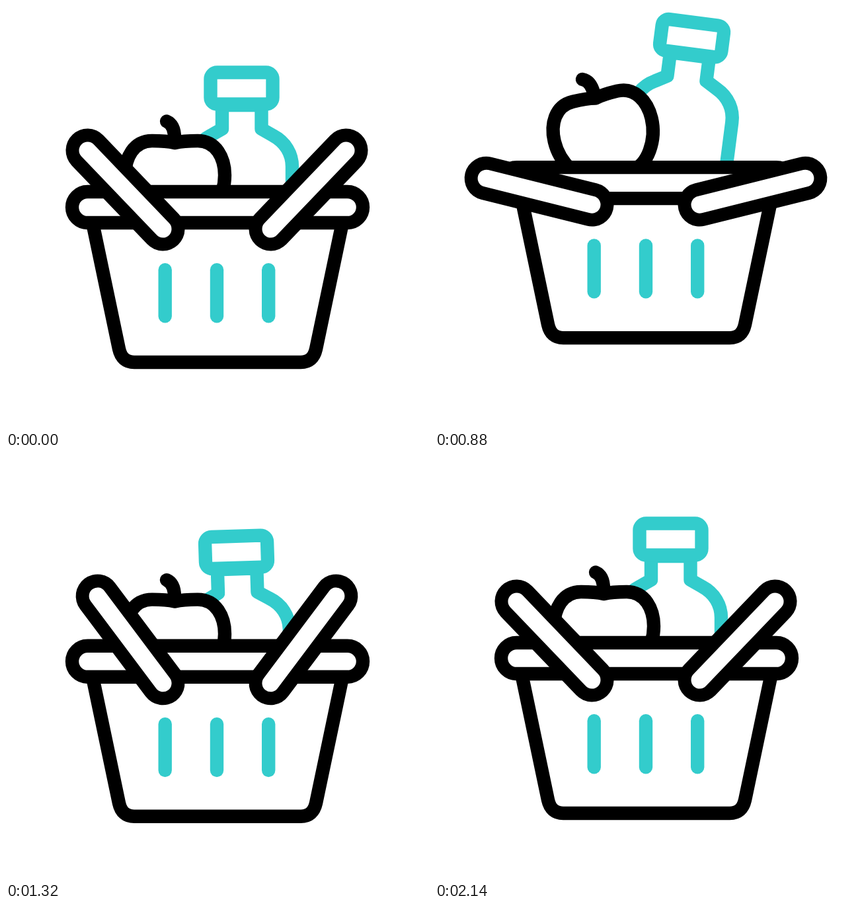
An HTML page with a canvas for the animation above (2.2 s loop, 640 px wide and 640 px high).

```html
<!DOCTYPE html>
<html lang="en">
<head>
<meta charset="utf-8">
<title>Shopping basket</title>
<style>
html, body { margin: 0; width: 100%; height: 100%; overflow: hidden; background: #fff; }
canvas { display: block; width: 640px; height: 640px; }
</style>
</head>
<body>
<canvas id="stage"></canvas>
<script>
const LOOP = 2200;
const INK = '#000', TEAL = '#33cccc', PAPER = '#fff';
const canvas = document.getElementById('stage');
const ctx = canvas.getContext('2d');
const dpr = window.devicePixelRatio || 1;
canvas.width = canvas.height = 640 * dpr;

// Key times shared by all tracks
const times = [200, 380, 560, 740, 815, 880, 1040, 1180, 1280, 1320, 1460, 1580, 1700, 1840, 2140];
const lift = track([0, 40, -4, -38, -41, -37, 9, 40, 18, 5, -17, -7, -2, -0.5, 0]);
const spread = track([0, -11, 0, 26, 31.5, 32.2, 12.8, -8, -9, -7, 9.8, 6.4, 2, 0.3, 0]);
const bottleY = track([0, 18, -7.8, -29, -38, -41, -11, 17, 19, 14.5, -15, -12, -4, -0.5, 0]);
const bottleTilt = track([0, -3, 1.85, 5.5, 6.9, 7.35, 4.35, -1, -2.6, -1.85, 3.6, 3.3, 1, 0.1, 0]);
const appleY = track([0, 14, -11, -29, -33, -32, 12, 20, 13, 7, -10, -6, -2, -0.3, 0]);
const appleTilt = track([0, 3, -7.3, -13, -14, -13.5, -0.6, 1, 0.5, 0, -1.5, -1, -0.3, 0, 0]);

// Smooth curve through the keys that never overshoots them
function track(vals) {
  const last = times.length - 1;
  const rate = i => (vals[i + 1] - vals[i]) / (times[i + 1] - times[i]);
  const slope = vals.map((_, i) => {
    if (i === 0 || i === last) return 0;
    const a = rate(i - 1), b = rate(i);
    return a * b > 0 ? 2 * a * b / (a + b) : 0;
  });
  return t => {
    if (t <= times[0]) return vals[0];
    if (t >= times[last]) return vals[last];
    let i = 0;
    while (t > times[i + 1]) i++;
    const h = times[i + 1] - times[i], u = (t - times[i]) / h, v = 1 - u;
    return v * v * ((1 + 2 * u) * vals[i] + u * h * slope[i])
         + u * u * ((3 - 2 * u) * vals[i + 1] - v * h * slope[i + 1]);
  };
}

const bottle = new Path2D(
  'M280.5 380 V243 C280.5 224 290.5 206 309.5 196 L327 186 V150 ' +
  'H386.5 V186 L404 196 C423 206 433 224 433 243 V380');
const apple = new Path2D(
  'M255.5 207 C268 204 279 204 290 204 C318 204 331 230 331 256 C331 290 308 325 285 325 ' +
  'H226 C203 325 180 290 180 256 C180 230 193 204 221 204 C232 204 243 204 255.5 207 Z');
const stem = new Path2D('M243 174.5 C251 178 255 186 255 200');
const body = new Path2D(
  'M132 333 L171 519 Q175.5 539 194 539 H446 Q464.500 539 469 519 L508 333');
const cap = pill(309.5, 100.5, 94, 48, 10);
const rim = pill(100, 281, 440, 47, 23.5);

function pill(x, y, w, h, r) {
  const p = new Path2D();
  p.roundRect(x, y, w, h, r);
  return p;
}

function shape(path, color, fill = PAPER) {
  if (fill) {
    ctx.fillStyle = fill;
    ctx.fill(path);
  }
  ctx.strokeStyle = color;
  ctx.lineWidth = 20.4;
  ctx.stroke(path);
}

function bar(x1, y1, x2, y2, width, color) {
  ctx.strokeStyle = color;
  ctx.lineWidth = width;
  ctx.beginPath();
  ctx.moveTo(x1, y1);
  ctx.lineTo(x2, y2);
  ctx.stroke();
}

function tilted(x, y, dy, deg, paint) {
  ctx.save();
  ctx.translate(x, y + dy);
  ctx.rotate(deg * Math.PI / 180);
  ctx.translate(-x, -y);
  paint();
  ctx.restore();
}

function handle(side, deg) {
  const a = deg * Math.PI / 180, x = 319 + side * 81.5, y = 337.5;
  const tipX = x + side * 164.8 * Math.cos(a), tipY = y - 164.8 * Math.sin(a);
  bar(x, y, tipX, tipY, 66, INK);
  bar(x, y, tipX, tipY, 26, PAPER);
}

function draw(t) {
  ctx.setTransform(dpr, 0, 0, dpr, 0, 0);
  ctx.fillStyle = PAPER;
  ctx.fillRect(0, 0, 640, 640);
  ctx.lineCap = ctx.lineJoin = 'round';
  ctx.translate(0, lift(t));

  tilted(356.75, 375, bottleY(t), bottleTilt(t), () => {
    shape(bottle, TEAL);
    shape(cap, TEAL);
  });
  tilted(255.5, 262, appleY(t), appleTilt(t), () => {
    shape(apple, INK);
    shape(stem, INK, null);
  });

  shape(body, INK);
  for (const x of [240.7, 319, 397.2]) bar(x, 399.3, x, 469.2, 20.4, TEAL);
  shape(rim, INK);

  const angle = 46.2 - spread(t);
  handle(-1, angle);
  handle(1, angle);
}

const start = performance.now();
function frame() {
  draw((performance.now() - start) % LOOP);
  requestAnimationFrame(frame);
}
frame();
</script>
</body>
</html>
```
